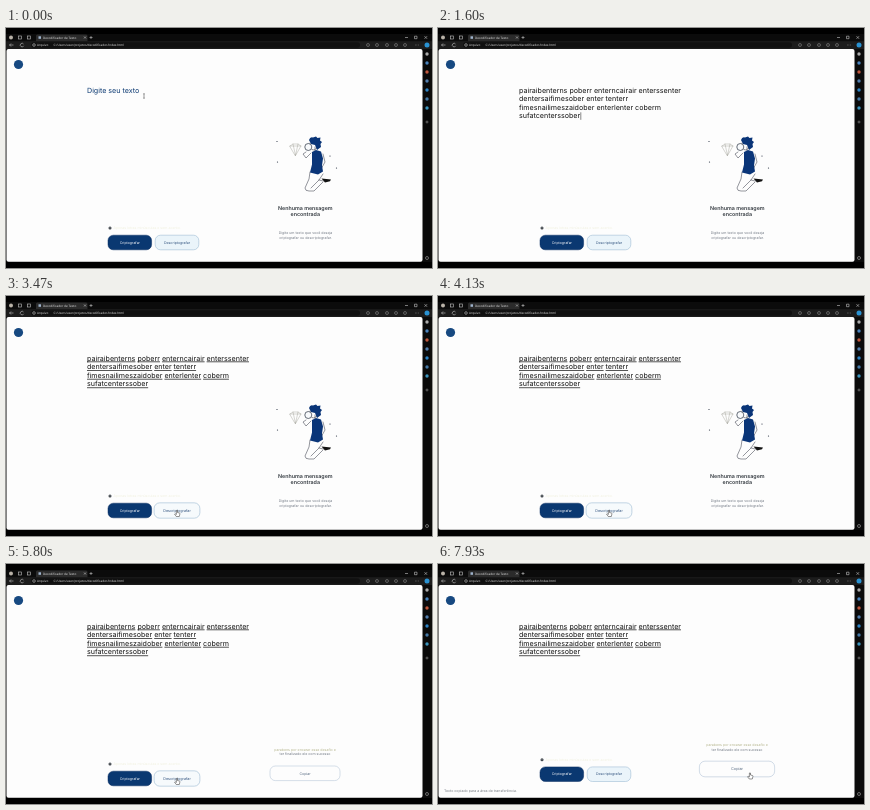
Write an HTML page that moves like this. It is 426 by 240 pixels and loops after 8 s.

```html
<!DOCTYPE html>
<html lang="pt-BR">
<head>
<meta charset="utf-8">
<title>Decodificador de Texto</title>
<style>
  html, body { margin: 0; width: 100%; height: 100%; overflow: hidden; background: #000; }
  svg { display: block; width: 100vw; height: 100vh; }
  text { font-family: Inter, sans-serif; font-size: 3.55px; text-rendering: geometricPrecision; white-space: pre; }
  .mid { text-anchor: middle; }
  .big { font-size: 7.11px; }
  .title { font-size: 5.33px; font-weight: 600; fill: #343a40; }
  .note { fill: #747b86; }
  .chrome { font-family: "Noto Sans", sans-serif; font-size: 3.1px; fill: #dedede; }
  .line { fill: none; stroke: #292d3a; stroke-width: .5; stroke-linejoin: round; stroke-linecap: round; }
  .navy { fill: #0a3578; }
</style>
</head>
<body>
<svg viewBox="0 0 426 240" preserveAspectRatio="none">
  <rect width="426" height="240" fill="#000"/>
  <g id="browser">
    <rect y="6" width="426" height="228" fill="#0b0b0b"/>
    <path d="M30 13.2V8q0-1.5 1.5-1.5H80q1.5 0 1.5 1.5v5.2z" fill="#2b2b2b"/>
    <rect y="13.2" width="426" height="7.8" fill="#1c1c1c"/>
    <rect x="25" y="14.2" width="329" height="5.6" rx="2.8" fill="#101010"/>
    <circle cx="5" cy="9.5" r="2" fill="#b9b2a8"/>
    <g fill="none" stroke="#c4c4c4" stroke-width=".6">
      <rect x="12.5" y="8" width="3" height="3"/>
      <rect x="21.5" y="8" width="3" height="3"/>
      <path d="M7.5 17H3.5l1.5-1.5M3.5 17l1.5 1.5M17.5 16a1.8 1.8 0 1 0 .2 1.8M78 8.5l2 2m0-2l-2 2M85 8v3m-1.5-1.5h3M399 9.5h3M408.5 8.2h2.5v2.5h-2.5zM418.5 8.2l2.6 2.6m0-2.6l-2.6 2.6"/>
      <circle cx="28" cy="17" r="1.3"/>
    </g>
    <rect x="32.5" y="8.3" width="2.5" height="2.5" fill="#9fb3cc"/>
    <text class="chrome" x="37" y="10.7">Decodificador de Texto</text>
    <text class="chrome" x="31" y="18.1">Arquivo</text>
    <text class="chrome" x="47.5" y="18.1">C:/Users/user/projetos/decodificador/index.html</text>
  </g>

  <rect x=".5" y="21" width="416" height="212.8" rx="2" fill="#fdfdfd"/>
  <circle cx="12.5" cy="36.5" r="4.6" fill="#174981"/>

  <text id="hint" class="big" x="81" y="64.5" fill="#0a3871">Digite seu texto</text>
  <g id="message"></g>
  <path id="caret" d="M142.8 84.3v7.5" stroke="#111" stroke-width=".5"/>

  <g id="empty">
    <g class="line">
      <path d="M284 118l3-2h5l3 2-5.5 9.5zM284 118h11M287 116l2.500 11.500 2.500-11.500" stroke="#8a8a7c" stroke-width=".35"/>
      <path d="M305 125l-5 5-3-4 3-2M304 115q-1 7 4 7l3-2M309 119v4M317 126l2 8-5 9"/>
      <path d="M304 144l-1 7-4 9q0 3 4 3h5l9-9M317 146l-4 6-8 8M313 152l4 1"/>
    </g>
    <path class="navy" d="M303 112q1-3.500 4-2.500l3-1 1.500 1.500 3-.5-.5 3 2 1.500-1.500 2 .5 3-4 3-2-5-4-1zM306 124l4-2 5 1.500 2 7-1 7 1 6-5 3-8-2 2-8z"/>
    <path d="M315.500 150.500l9.500 1-1 1.700-5 1.300z" fill="#111"/>
    <circle cx="302.300" cy="119" r="3.500" fill="#f8fafc" stroke="#26303f" stroke-width=".7"/>
    <g fill="#222b3c">
      <circle cx="271" cy="113.500" r=".6"/><circle cx="271.500" cy="134" r=".6"/>
      <circle cx="324" cy="128" r=".6"/><circle cx="330.500" cy="140" r=".6"/>
    </g>
    <text class="title mid" x="299.300" y="181.800">Nenhuma mensagem</text>
    <text class="title mid" x="299.300" y="188.200">encontrada</text>
    <text class="note mid" x="299.500" y="206.300">Digite um texto que você deseja</text>
    <text class="note mid" x="299.500" y="210.800">criptografar ou descriptografar.</text>
  </g>

  <g id="footer">
    <circle cx="104" cy="200" r="1.500" fill="#343a40"/>
    <path d="M104 199v1.300m0 .4v.4" stroke="#fff" stroke-width=".4"/>
    <text x="107.500" y="201.300" fill="#f1f1e0">Apenas letras minúsculas e sem acento.</text>
    <g id="encrypt">
      <rect x="-21.800" y="-7.300" width="43.600" height="14.600" rx="5.300" fill="#0a3871" stroke="#082c60" stroke-width=".5"/>
      <text class="mid" y="1.250" fill="#fff">Criptografar</text>
    </g>
    <g id="decrypt">
      <rect x="-21.800" y="-7.300" width="43.600" height="14.600" rx="5.300" stroke="#8fb0cc" stroke-width=".5"/>
      <text class="mid" y="1.250" fill="#31537f">Descriptografar</text>
    </g>
    <g id="result">
      <text class="mid" x="299" y="186.500" fill="#b5b58d">parabens por encarar esse desafio e</text>
      <text class="mid" x="299" y="191" fill="#747b86">ter finalizado ele com sucesso</text>
      <g id="copy">
        <rect x="-35" y="-7.300" width="70" height="14.600" rx="5.300" fill="#fdfdfd" stroke="#a3b8cf" stroke-width=".45"/>
        <text class="mid" y="1.250" fill="#53677f">Copiar</text>
      </g>
    </g>
  </g>
  <text id="toast" x="6" y="228.300" fill="#777d84">Texto copiado para a área de transferência.</text>

  <path id="beam" d="M-.8-2.200h1.600M0-2.200v4.400M-.8 2.200h1.600" stroke="#222" stroke-width=".45"/>
  <path id="hand" d="M-.6-2.500q.6-.7 1.100 0v2l2 .5q.6.200.4 1l-.6 2.500h-3l-1.700-2.300q.4-.8 1.800.2z" fill="#fff" stroke="#111" stroke-width=".45"/>
  <path id="arrow" d="M0-2.500v5l1.200-1 .9 1.800.8-.4-.9-1.700h1.600z" fill="#fff" stroke="#111" stroke-width=".35"/>
</svg>
<script>
const DURATION = 8000;
const PASTE = 800, SPELLCHECK = 1900, BLUR = 2350, DECODE = 4900, COPIED = 7500;
const CARET_START = 1300, CARET_HALF = 530;
const NS = "http://www.w3.org/2000/svg";
const $ = id => document.getElementById(id);

function add(parent, tag, attributes, content = "") {
  const node = document.createElementNS(NS, tag);
  for (const [name, value] of Object.entries(attributes)) node.setAttribute(name, value);
  node.textContent = content;
  return parent.appendChild(node);
}

const lines = [
  "pairaibenterns poberr enterncairair enterssenter",
  "dentersaifimesober enter tenterr",
  "fimesnailimeszaidober enterlenter coberm",
  "sufatcenterssober"
];
const words = [];
lines.forEach((line, row) => {
  const text = add($("message"), "text", { class: "big", x: 81, y: 64.5 + row * 8.65, fill: "#111" });
  line.split(" ").forEach((word, i) => {
    if (i) text.append(" ");
    words.push(add(text, "tspan", {}, word));
  });
});

// Toolbar and sidebar icons
for (const x of [362, 371, 381, 390, 399])
  add($("browser"), "rect", { x: x - 1.3, y: 15.7, width: 2.6, height: 2.6, rx: .8, fill: "none", stroke: "#aaa", "stroke-width": .5 });
add($("browser"), "path", { d: "M409 17h.6m1 0h.6m1 0h.6", stroke: "#aaa", "stroke-width": .6 });
["#2992d2", "#aaa", "#4a83bd", "#c0573d", "#527eae", "#2d83c5", "#4578a5", "#3c95bd"].forEach((fill, i) =>
  add($("browser"), "circle", { cx: 421, cy: 17 + i * 9, r: i ? 1.7 : 2.5, fill }));
add($("browser"), "path", { d: "M421 92.5v3m-1.5-1.5h3", stroke: "#aaa", "stroke-width": .5 });
add($("browser"), "circle", { cx: 421, cy: 230, r: 1.5, fill: "none", stroke: "#aaa", "stroke-width": .6 });

const pointerPath = [
  [0, 138, 68], [1850, 138, 68], [2300, 130, 216], [2650, 135, 217],
  [2800, 158.5, 217.5], [3150, 171, 217], [6100, 171, 217], [6750, 312, 211.5], [8000, 312, 211.5]
];
const clamp = value => Math.max(0, Math.min(1, value));
const ease = value => value * value * (3 - 2 * value);
const hover = (t, enter, leave) => ease(clamp((t - enter) / 300)) * (1 - ease(clamp((t - leave) / 300)));
const show = (id, visible) => $(id).setAttribute("visibility", visible ? "visible" : "hidden");
const place = (id, x, y, scale = 1) => $(id).setAttribute("transform", `translate(${x} ${y}) scale(${scale})`);

function pointerAt(t) {
  const next = Math.max(1, pointerPath.findIndex(point => point[0] > t));
  const [t0, x0, y0] = pointerPath[next - 1], [t1, x1, y1] = pointerPath[next];
  const k = ease((t - t0) / (t1 - t0));
  return [x0 + (x1 - x0) * k, y0 + (y1 - y0) * k];
}

function render(t) {
  const pasted = t >= PASTE;
  const caretOn = Math.floor((t - CARET_START) / CARET_HALF) % 2 === 0;
  show("hint", !pasted);
  show("message", pasted);
  show("caret", pasted && t < BLUR && caretOn);
  for (const word of words) {
    word.style.textDecoration = t >= SPELLCHECK ? "underline .4px #675555" : "none";
    word.style.textUnderlineOffset = ".7px";
  }

  const decryptHover = hover(t, 2750, 6150);
  place("encrypt", 123.8, 214.5, 1 + .06 * hover(t, 2200, 2700));
  place("decrypt", 171, 214.5, 1 + .05 * decryptHover);
  $("decrypt").firstElementChild.setAttribute("fill", decryptHover > .5 ? "#f6fafc" : "#eaf4fa");
  place("copy", 299, 209.3, 1 + .075 * hover(t, 6600, DURATION));

  show("empty", t < DECODE);
  show("result", t >= DECODE);
  show("toast", t >= COPIED);
  place("footer", 0, t >= COPIED ? -4.3 : 0);

  const [x, y] = pointerAt(t);
  const overText = x < 250 && y < 195;
  const overButton = y > 204 && (x < 194 || x > 264);
  show("beam", overText && (!pasted || t > 1850));
  show("hand", overButton);
  show("arrow", !overText && !overButton);
  for (const id of ["beam", "hand", "arrow"]) place(id, x, y);
}

function tick() {
  render(performance.now() % DURATION);
  requestAnimationFrame(tick);
}
tick();
</script>
</body>
</html>
```
